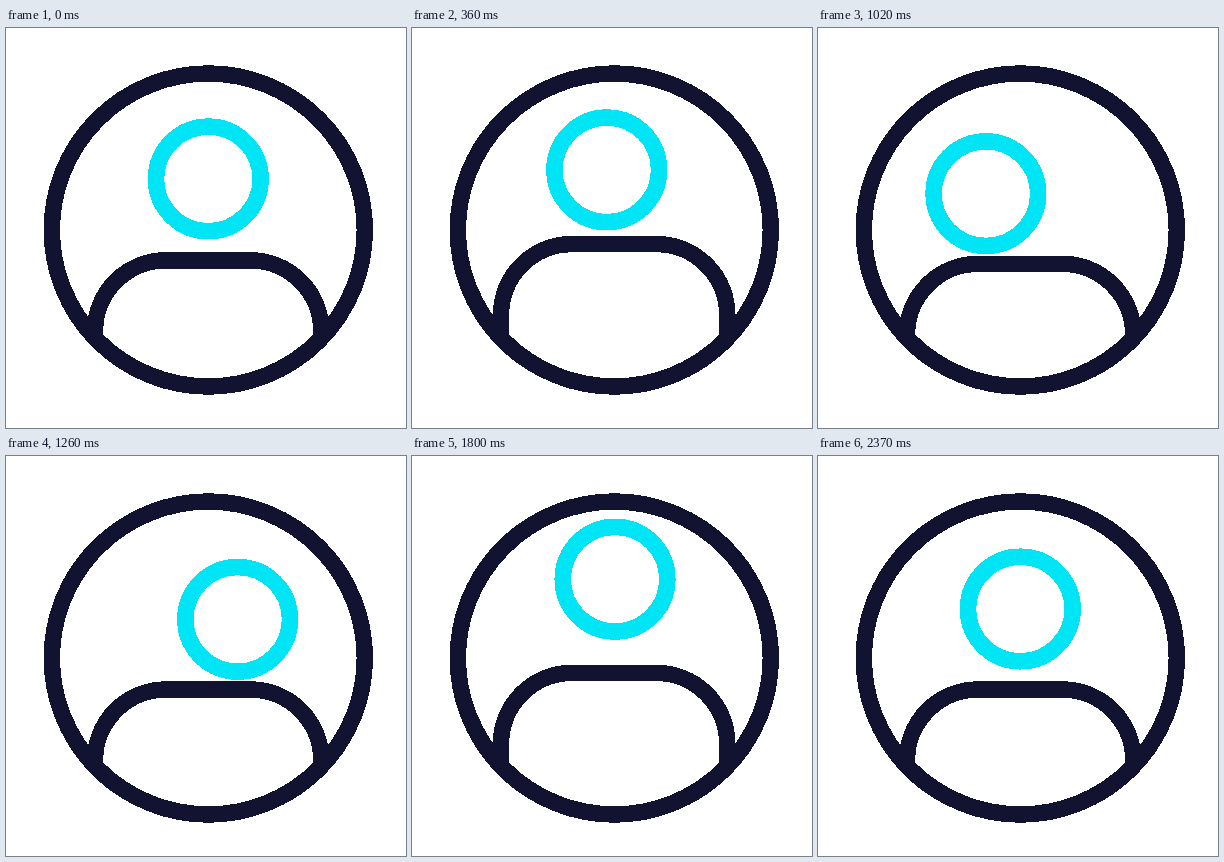
Recreate the animation shown at these times as an HTML page. Size 400 px wide and 400 px high, loop 2.46 s.

```html
<!DOCTYPE html>
<html lang="en">
<head>
<meta charset="utf-8">
<title>Avatar jump</title>
<style>
  html, body { margin: 0; width: 100%; height: 100%; overflow: hidden; background: #fff; }
  svg { display: block; width: 100vw; height: 100vh; shape-rendering: crispEdges; }
  svg * { fill: none; stroke: #121331; stroke-width: 16.5; }
  #head { stroke: #00e5f6; }
</style>
</head>
<body>
<svg viewBox="0 0 400 400">
  <path id="body" stroke-linecap="round"/>
  <circle cx="202.3" cy="202" r="156.5"/>
  <circle id="head" r="52.3"/>
</svg>
<script>
const LOOP = 2460, STEP = 30;
const LEFT = 89, RIGHT = 315.3, FLOOR = 310, RADIUS = 71;
const CENTER = 202.3, HEAD_REST = 153, HEAD_LOW = 163.3, BODY_REST = 233.5;
const GRAVITY = 0.00112, LIFT = 29.5, DIP = 6.5, PRESS = 4;

const span = (t, from, to) => Math.min(1, Math.max(0, (t - from) / (to - from)));
const mix = (a, b, u) => a + (b - a) * u;
const rise = u => Math.sin(u * Math.PI / 2);
const smooth = u => u * u * (3 - 2 * u);

// Slows down towards the peak, then falls freely until it lands.
function hop(t, start, peak, from, top, land) {
  return t < peak
    ? mix(from, top, rise(span(t, start, peak)))
    : Math.min(land, top + GRAVITY * (t - peak) ** 2);
}

// Offset of the shoulders: up, down past the rest height, and back.
function shrug(t, start, peak, low, end) {
  return -LIFT * rise(span(t, start, peak))
    + (LIFT + DIP) * smooth(span(t, peak, low))
    - DIP * smooth(span(t, low, end));
}

function headX(t) {
  return CENTER
    - 41.8 * smooth(span(t, 282, 570))
    + 71.2 * smooth(span(t, 960, 1260))
    - 29.4 * smooth(span(t, 1530, 1828));
}

// The rolling head presses the shoulders down a little.
const press = t => PRESS * Math.sin(Math.PI * span(t, 960, 1260));

function headY(t) {
  const y = t < 1500
    ? hop(t, -6, 190, HEAD_REST, 109.5, HEAD_LOW)
    : hop(t, 1550, 2028, HEAD_LOW, 108.5, HEAD_REST);
  return y + press(t);
}

function bodyY(t) {
  return BODY_REST + press(t)
    + shrug(t, -6, 240, 549, 780)
    + shrug(t, 1610, 2110, 2310, 2370);
}

function bodyPath(top) {
  const ry = Math.min(RADIUS, FLOOR - top);
  const arc = `A${RADIUS} ${ry} 0 0 1`;
  return `M${LEFT} ${FLOOR}V${top + ry}${arc} ${LEFT + RADIUS} ${top}`
    + `H${RIGHT - RADIUS}${arc} ${RIGHT} ${top + ry}V${FLOOR}`;
}

const head = document.getElementById("head");
const body = document.getElementById("body");

function draw(ms) {
  const t = Math.floor((ms % LOOP) / STEP) * STEP;
  head.setAttribute("cx", headX(t));
  head.setAttribute("cy", headY(t));
  body.setAttribute("d", bodyPath(bodyY(t)));
}

const start = performance.now();
function tick() {
  draw(performance.now() - start);
  requestAnimationFrame(tick);
}
tick();
</script>
</body>
</html>
```
